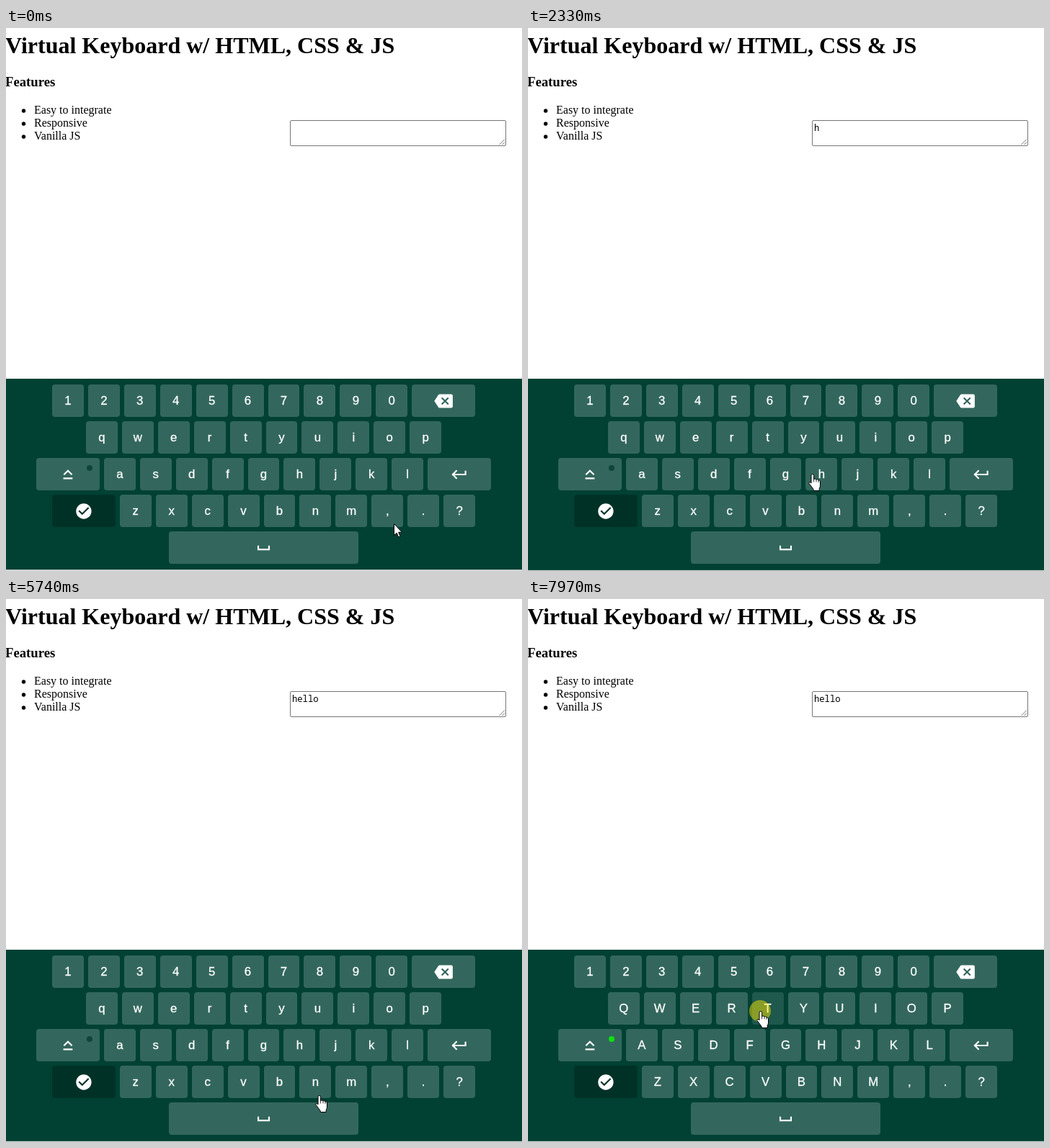
Recreate the animation shown at these times as an HTML page. Size 716 by 754 pixels, loop 8000 ms.

```html
<!DOCTYPE html>
<html lang="en">
<head>
<meta charset="utf-8">
<title>Virtual Keyboard</title>
<style>
  html, body { margin: 0; width: 100%; height: 100%; overflow: hidden; background: #fff; }
  svg { display: block; width: 716px; height: 754px; }
  text { white-space: pre; }
  .page { font-family: "Liberation Serif", "Times New Roman", serif; font-size: 16px; }
  .h1 { font-size: 32px; font-weight: 700; }
  .h3 { font-size: 18.72px; font-weight: 700; }
  .typed { font-family: "Noto Sans Mono", "DejaVu Sans Mono", monospace; font-size: 12.2px; }
  .key text {
    font-family: "Liberation Sans", Arial, sans-serif; font-size: 16.8px;
    fill: #fff; stroke: #fff; stroke-width: .3; text-anchor: middle;
  }
  .solid { fill: #fff; }
  .line { fill: none; stroke-width: 2; }
</style>
</head>
<body>
<svg id="stage" viewBox="0 0 716 754">
  <g class="page">
    <text class="h1" x="-1" y="35">Virtual Keyboard w/ HTML, CSS &amp; JS</text>
    <text class="h3" x="-1" y="81">Features</text>
    <g id="list"></g>
  </g>
  <rect x="394.5" y="128.5" width="299" height="35" rx="1.5" fill="#fff" stroke="#767676"/>
  <path d="M684.5 162L692 154.5M688.5 162L692 158.5" stroke="#777" fill="none"/>
  <text id="typed" class="typed" x="397" y="143"></text>
  <rect y="487" width="716" height="265" fill="#004134"/>
  <rect id="edge" y="752" width="716" height="1"/>
  <rect y="753" width="716" height="1" fill="#d0d2d1"/>
  <g id="keys"></g>
  <circle id="ripple" r="15" fill="rgba(255,235,0,.48)"/>
  <g id="cursor" stroke="#000" fill="#fff" stroke-linejoin="round">
    <path id="arrow" d="M.5.5V16.5L4.2 13.2 6.6 18.8 9 17.8 6.6 12.2H11.5Z"/>
    <g id="hand" transform="translate(-5 0)">
      <path d="M4 2.3a1.8 1.8 0 0 1 3.6 0V8q.2-1.2 1.7-1.1T11 8.5q.3-.9 1.6-.8T14 9.5q.5-.6 1.5-.3T16.5 11v5q0 2.500-1.2 4.2L15 23.500H7.500L7 21.500 3 16Q.3 12.700.8 12.100q1-1.100 2.300-.2L4 13Z"/>
      <path d="M7.6 8v3.5M11 8.5v3M14 9.5v2.5" fill="none" stroke-width=".8"/>
    </g>
  </g>
</svg>
<script>
const LOOP = 8000, STEP = 110, CENTER = 357.5, UNIT = 43.92, GAP = 6;
const $ = id => document.getElementById(id);

function add(parent, tag, attrs, text = '') {
  const el = document.createElementNS('http://www.w3.org/2000/svg', tag);
  for (const name in attrs) el.setAttribute(name, attrs[name]);
  el.textContent = text;
  parent.append(el);
  return el;
}

['Easy to integrate', 'Responsive', 'Vanilla JS'].forEach((item, i) => {
  add($('list'), 'circle', { cx: 24.5, cy: 115 + i * 18, r: 2.7 });
  add($('list'), 'text', { x: 39, y: 119 + i * 18 }, item);
});

// Icons on a 24-unit grid; lines over a solid shape take the key colour
const ICONS = {
  backspace: { solid: 'M7 3H22q2 0 2 2V19q0 2-2 2H7q-1 0-1.600-.9L0 12 5.400 3.900Q6 3 7 3Z', line: 'M9.700 7.700l8.600 8.600m0-8.600l-8.600 8.600' },
  caps: { line: 'M6.700 12.300L12 7l5.300 5.300M6 17h12' },
  enter: { line: 'M20 7v5H4M8.700 6.700L3.400 12l5.300 5.300' },
  done: { solid: 'M2 12a10 10 0 0 0 20 0a10 10 0 0 0-20 0', line: 'M5.700 11.300l4.300 4.300 8.300-8.300' },
  space: { line: 'M5 9v5h14V9' }
};
const ROWS = [
  [...'1234567890', 'backspace'],
  [...'qwertyuiop'],
  ['caps', ...'asdfghjkl', 'enter'],
  ['done', ...'zxcvbnm,.?'],
  ['space']
];
const keyWidth = name => UNIT * (name === 'space' ? 6 : ICONS[name] ? 2 : 1);

const keys = {};
function addKey(name, x, y) {
  const w = keyWidth(name), left = Math.round(x), mid = x + w / 2;
  const g = add($('keys'), 'g', { class: 'key' });
  const base = name === 'done' ? '#003127' : '#33675d';
  const box = add(g, 'rect', { x: left, y, width: Math.round(x + w) - left, height: 45, rx: 4, fill: base });
  const icon = ICONS[name];
  let label = null;
  if (icon) {
    const art = add(g, 'g', { transform: `translate(${mid - 12.8} ${y + 10.2}) scale(1.0667)` });
    if (icon.solid) add(art, 'path', { class: 'solid', d: icon.solid });
    add(art, 'path', { class: 'line', d: icon.line, stroke: icon.solid ? base : '#fff' });
  } else {
    label = add(g, 'text', { x: mid, y: y + 28 }, name);
  }
  keys[name] = { name, box, label, base, x: mid, y: y + 22.5 };
}
ROWS.forEach((row, r) => {
  const total = row.reduce((sum, name) => sum + keyWidth(name) + GAP, -GAP);
  let x = CENTER - total / 2;
  for (const name of row) {
    addKey(name, x, 495 + r * 51);
    x += keyWidth(name) + GAP;
  }
});
const lamp = add($('keys'), 'circle', { cx: 116, cy: 611, r: 4 });

// A pass goes through a point; a tap reaches a key, then presses it once or more
const pass = (at, x, y) => ({ at, until: at, x, y, presses: [] });
function tap(key, at, dx, dy, down, up, times = 1) {
  const span = (up - down) / (2 * times - 1);
  const presses = Array.from({ length: times }, (_, i) =>
    ({ key, down: down + 2 * i * span, up: down + (2 * i + 1) * span }));
  return { at, until: up, x: keys[key].x + dx, y: keys[key].y + dy, presses };
}
const MOVES = [
  pass(0, 538, 688),
  pass(170, 256, 530),
  pass(600, 226, 538),
  pass(880, 269, 533),
  pass(1300, 312, 577),
  tap('h', 2090, -13, -1, 2190, 2330),
  pass(2780, 188, 575),
  tap('e', 2860, 3, 0, 2890, 3150),
  pass(3410, 434, 620),
  pass(3950, 522, 633),
  tap('l', 4150, -16, -10, 4150, 4490, 2),
  tap('o', 4840, -8, 3, 5070, 5290),
  tap('space', 5830, 54, -3, 5970, 6190),
  pass(6380, 122, 668),
  tap('caps', 6710, 12, -2, 6760, 6870),
  tap('t', 7810, -11, 3, 7960, LOOP)
];
const PRESSES = MOVES.flatMap(move => move.presses);
const capsOn = PRESSES.find(p => p.key === 'caps').up;

function pointerAt(t) {
  const next = MOVES.findIndex(m => m.at > t);
  const from = MOVES.at(next < 0 ? -1 : next - 1);
  if (next < 0 || t <= from.until) return [from.x, from.y].map(Math.round);
  const to = MOVES[next], k = (t - from.until) / (to.at - from.until);
  return [from.x + (to.x - from.x) * k, from.y + (to.y - from.y) * k].map(Math.round);
}

const show = (el, on) => { el.style.display = on ? '' : 'none'; };

function draw(t) {
  const [x, y] = pointerAt(Math.floor(t / STEP) * STEP);
  const press = PRESSES.find(p => t >= p.down && t < p.up);
  const upper = t >= capsOn;

  $('cursor').setAttribute('transform', `translate(${x} ${y})`);
  show($('arrow'), t < STEP);
  show($('hand'), t >= STEP);
  $('ripple').setAttribute('cx', x);
  $('ripple').setAttribute('cy', y);
  show($('ripple'), press);

  for (const key of Object.values(keys)) {
    key.box.setAttribute('fill', press && press.key === key.name ? '#1f584c' : key.base);
    if (key.label) key.label.textContent = upper ? key.name.toUpperCase() : key.name;
  }
  lamp.setAttribute('fill', upper ? '#0fe010' : '#0f463b');
  $('edge').setAttribute('fill', t < PRESSES[0].down ? '#c8cfcd' : '#23564b');
  $('typed').textContent = PRESSES
    .filter(p => t >= p.up && p.key !== 'caps')
    .map(p => p.key === 'space' ? ' ' : p.key).join('');
}

const start = performance.now();
function frame() {
  draw((performance.now() - start) % LOOP);
  requestAnimationFrame(frame);
}
frame();
</script>
</body>
</html>
```
